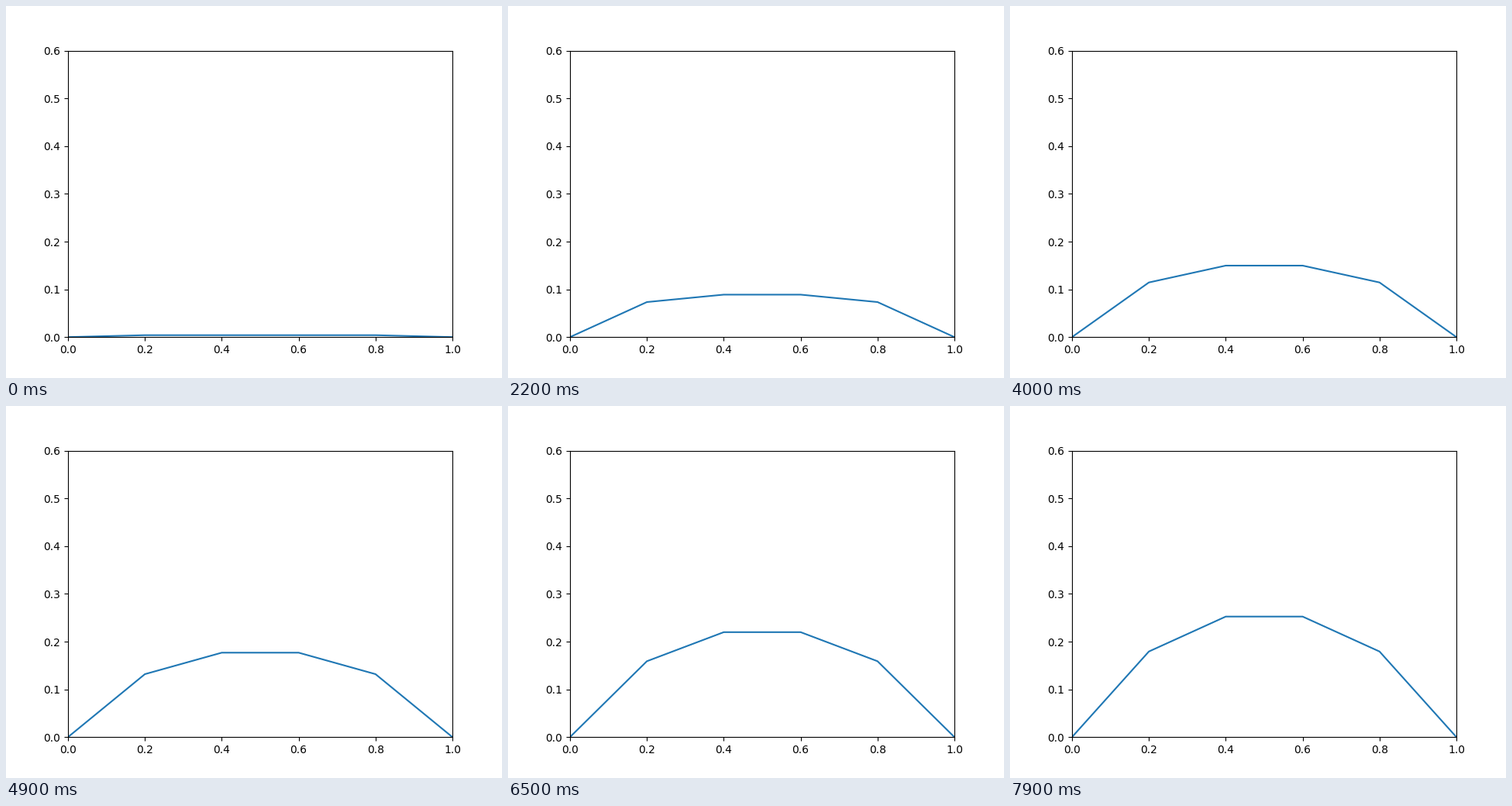
A matplotlib script that plays this animation: 640x480 px, repeating every 8000 ms.

```python
import numpy as np
import matplotlib.pyplot as plt
from matplotlib.animation import FuncAnimation

FRAMES = 80
DT = 0.001
HEAT = 4.0

x = np.linspace(0, 1, 6)
dx = x[1] - x[0]


def step(u):
    """One explicit step of the heated rod; both ends stay at zero."""
    new = u.copy()
    new[1:-1] += DT * ((u[2:] - 2 * u[1:-1] + u[:-2]) / dx**2 + HEAT)
    return new


states = [step(np.zeros_like(x))]
while len(states) < FRAMES:
    states.append(step(states[-1]))

plt.rcParams["font.family"] = "DejaVu Sans"
fig, ax = plt.subplots(figsize=(6.4, 4.8), dpi=100)
ax.set_xlim(0, 1)
ax.set_ylim(0, 0.6)
line, = ax.plot(x, states[0], color="#1f77b4", lw=1.5)


def update(i):
    line.set_ydata(states[i])
    return line,


anim = FuncAnimation(fig, update, frames=FRAMES, interval=100,
                     repeat=True, repeat_delay=0)
plt.show()
```
